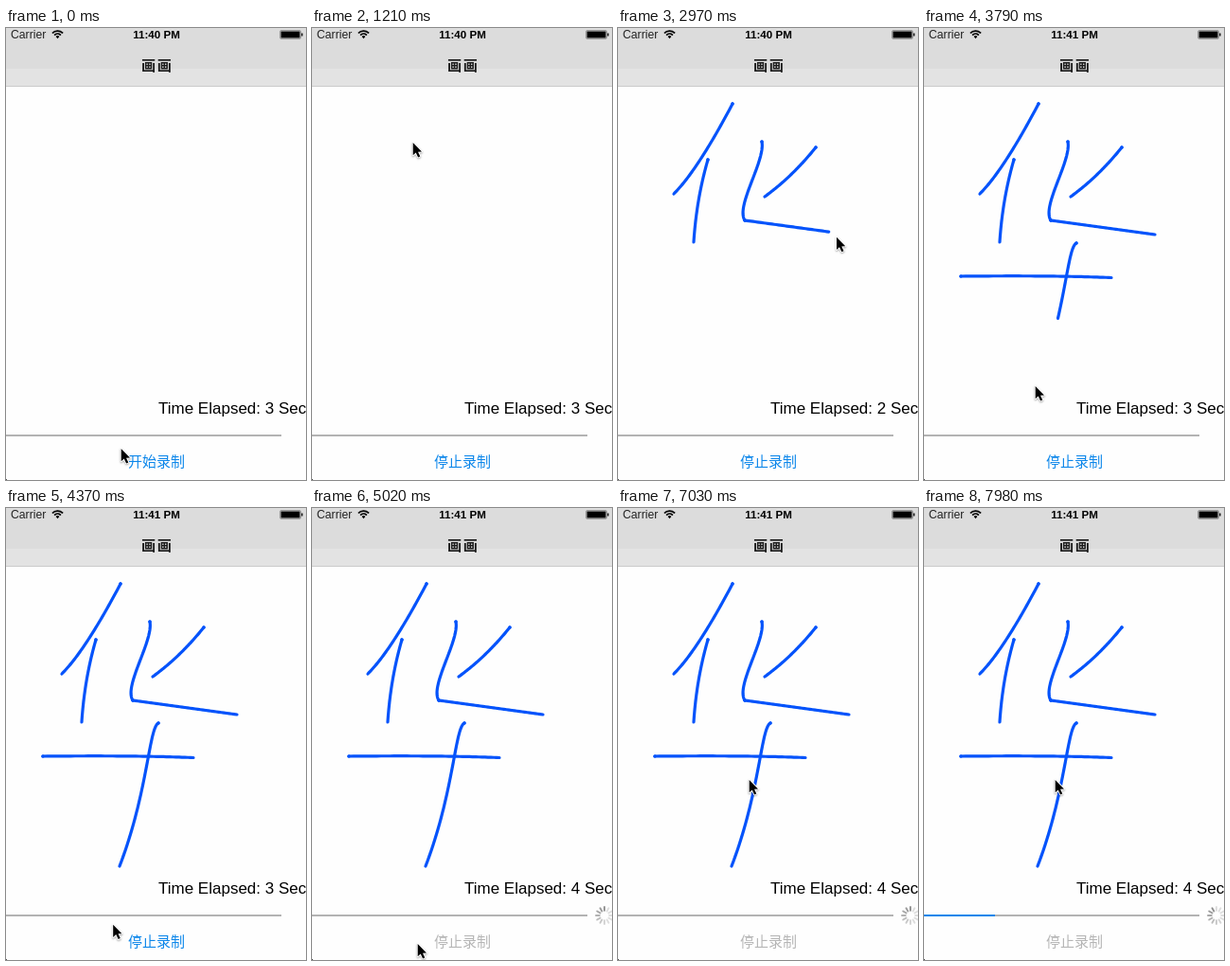
Animation, 317 px wide and 477 px high, one loop 8000 ms. Source, as an HTML page with a canvas:

```html
<!DOCTYPE html>
<html lang="zh-CN">
<head>
<meta charset="utf-8">
<title>画画</title>
<style>
html, body { margin: 0; width: 100%; height: 100%; overflow: hidden; background: #fefefe; }
canvas { display: block; width: 317px; height: 477px; }
</style>
</head>
<body>
<canvas id="stage"></canvas>
<script>
const W = 317, H = 477, LOOP = 8000;
const INK_LAG = 70;
const RECORD = 570, PRESS = 4570, DISABLED = 4850;
const BLUE = '#0b86ea', INK = '#0453fb';
const LATIN = '"Liberation Sans", Arial, sans-serif';
const CJK = '"Noto Sans CJK SC", "Noto Sans CJK", sans-serif';

const canvas = document.getElementById('stage');
const ctx = canvas.getContext('2d');
const ratio = window.devicePixelRatio || 1;
canvas.width = Math.round(W * ratio);
canvas.height = Math.round(H * ratio);

// Pointer legs: one point is a rest, several are the controls of a drawn Bezier.
// The pointer eases from each leg to the next.
const leg = (t0, t1, ...pts) => ({ t0, t1, pts });
const legs = [
  leg(0, RECORD, [122, 444]),
  leg(1210, 1210, [107, 121]),
  leg(1330, 1540, [118, 85]),
  leg(1570, 1830, [121, 80], [84, 150], [59, 175]),
  leg(1960, 2140, [95, 139], [83, 180], [80, 226]),
  leg(2350, 2490, [209, 126], [184, 157], [155, 178]),
  leg(2590, 2780, [152, 120], [156, 140], [124, 188], [134, 203]),
  leg(2780, 2930, [134, 203], [244, 218]),
  leg(3200, 3420, [39, 262], [140, 261], [198, 263.5]),
  leg(3600, 3780, [161, 227], [151, 232], [150, 300], [120, 378]),
  leg(3790, 4020, [118, 378]),
  leg(4540, 5310, [112, 460]),
  leg(5960, LOOP, [139, 287])
];
const strokes = legs.filter(l => l.pts.length > 1);

const clamp = v => Math.max(0, Math.min(1, v));
const ease = u => u * u * (3 - 2 * u);
const mix = (a, b, u) => [a[0] + (b[0] - a[0]) * u, a[1] + (b[1] - a[1]) * u];

function bezier(pts, u) {
  if (pts.length === 1) return pts[0];
  return bezier(pts.slice(1).map((p, i) => mix(pts[i], p, u)), u);
}

function pointerAt(t) {
  const i = legs.findLastIndex(l => l.t0 <= t);
  const { t0, t1, pts } = legs[i];
  if (t < t1) return bezier(pts, (t - t0) / (t1 - t0));
  const next = legs[i + 1];
  return mix(pts[pts.length - 1], next.pts[0], ease((t - t1) / (next.t0 - t1)));
}

function text(str, x, y, font, color = '#000', align = 'left', spacing = 0) {
  ctx.font = font;
  ctx.fillStyle = color;
  ctx.textAlign = align;
  ctx.letterSpacing = spacing + 'px';
  ctx.fillText(str, x, y);
}

function rect(x, y, w, h, color) {
  ctx.fillStyle = color;
  ctx.fillRect(x, y, w, h);
}

function drawHeader(t) {
  rect(0, 0, W, 43, '#dcdcdc');
  rect(0, 43, W, 18, '#e3e3e3');
  rect(0, 61, W, 1, '#cbcbcb');
  text('Carrier', 5, 11, '12.2px ' + LATIN, '#222');
  text(t < 3500 ? '11:40 PM' : '11:41 PM', 159, 11, 'bold 11.6px ' + LATIN, '#000', 'center');
  text('画画', 159.7, 44.7, 'bold 15.2px ' + CJK, '#1c1c1c', 'center', 1.5);

  ctx.strokeStyle = ctx.fillStyle = '#000';
  ctx.lineCap = 'butt';
  ctx.lineWidth = 1.8;
  for (const r of [4.6, 7.6]) {
    ctx.beginPath();
    ctx.arc(54.5, 10.7, r, -Math.PI * 0.76, -Math.PI * 0.24);
    ctx.stroke();
  }
  ctx.beginPath();
  ctx.moveTo(54.5, 11.2);
  ctx.arc(54.5, 10.7, 2.6, -Math.PI * 0.76, -Math.PI * 0.24);
  ctx.fill();

  ctx.strokeStyle = '#555';
  ctx.lineWidth = 0.5;
  ctx.beginPath();
  ctx.roundRect(289.5, 2.5, 22, 9, 1.5);
  ctx.stroke();
  rect(290.5, 3.5, 20, 7, '#000');
  rect(312.2, 5.5, 1.3, 3, '#000');
}

function drawInk(t) {
  ctx.strokeStyle = ctx.fillStyle = INK;
  ctx.lineWidth = 3.2;
  ctx.lineCap = ctx.lineJoin = 'round';
  for (const { t0, t1, pts } of strokes) {
    const end = clamp((t - INK_LAG - t0) / (t1 - t0));
    if (end === 0) continue;
    ctx.beginPath();
    for (let i = 0; i <= 40; i++) ctx.lineTo(...bezier(pts, end * i / 40));
    ctx.stroke();
    ctx.beginPath();
    ctx.arc(...pts[0], 1.8, 0, 2 * Math.PI);
    ctx.fill();
  }
}

function drawSpinner(t) {
  const head = Math.floor(t * 12 / 1000);
  ctx.lineWidth = 1.9;
  ctx.lineCap = 'round';
  for (let age = 0; age < 12; age++) {
    const a = (head - age) * Math.PI / 6 - Math.PI / 2;
    const shade = Math.min(222, 145 + age * 11);
    ctx.strokeStyle = `rgb(${shade},${shade},${shade})`;
    ctx.beginPath();
    for (const r of [5.2, 9]) ctx.lineTo(309 + r * Math.cos(a), 430 + r * Math.sin(a));
    ctx.stroke();
  }
}

function drawControls(t) {
  const elapsed = Math.floor((t - RECORD) / 1000);
  const seconds = elapsed < 1 ? 3 : Math.min(4, elapsed);
  text(`Time Elapsed: ${seconds} Sec`, 161, 407, '17px ' + LATIN);

  rect(0, 429, 291, 2, '#b3b3b3');
  rect(0, 429, 75 * clamp((t - 7040) / 940), 2, BLUE);
  if (t >= 4720) drawSpinner(t);

  const pressed = (t >= 420 && t < RECORD) || (t >= PRESS && t < DISABLED);
  ctx.globalAlpha = pressed ? 0.3 : 1;
  text(t < RECORD ? '开始录制' : '停止录制', 159, 463, '15px ' + CJK,
    t < DISABLED ? BLUE : '#b5b5b5', 'center');
  ctx.globalAlpha = 1;
  rect(0, 476, 1, 1, '#555');
}

function drawPointer([x, y]) {
  const outline = [[0, 0], [0, 14], [3.2, 11], [5.7, 16.2], [8, 15.2], [5.6, 10.2], [9.8, 10]];
  ctx.save();
  ctx.translate(x - 0.3, y);
  ctx.scale(0.95, 0.95);
  ctx.beginPath();
  outline.forEach(p => ctx.lineTo(...p));
  ctx.closePath();
  ctx.lineJoin = 'round';
  ctx.shadowColor = 'rgba(0,0,0,0.35)';
  ctx.shadowBlur = 2 * ratio;
  ctx.shadowOffsetY = ratio;
  ctx.strokeStyle = '#fff';
  ctx.lineWidth = 2;
  ctx.stroke();
  ctx.shadowColor = 'transparent';
  ctx.fillStyle = '#000';
  ctx.fill();
  ctx.restore();
}

const start = performance.now();
function frame() {
  const t = (performance.now() - start) % LOOP;
  ctx.setTransform(ratio, 0, 0, ratio, 0, 0);
  rect(0, 0, W, H, '#fefefe');
  drawHeader(t);
  drawInk(t);
  drawControls(t);
  drawPointer(pointerAt(t));
  requestAnimationFrame(frame);
}
frame();
</script>
</body>
</html>
```
